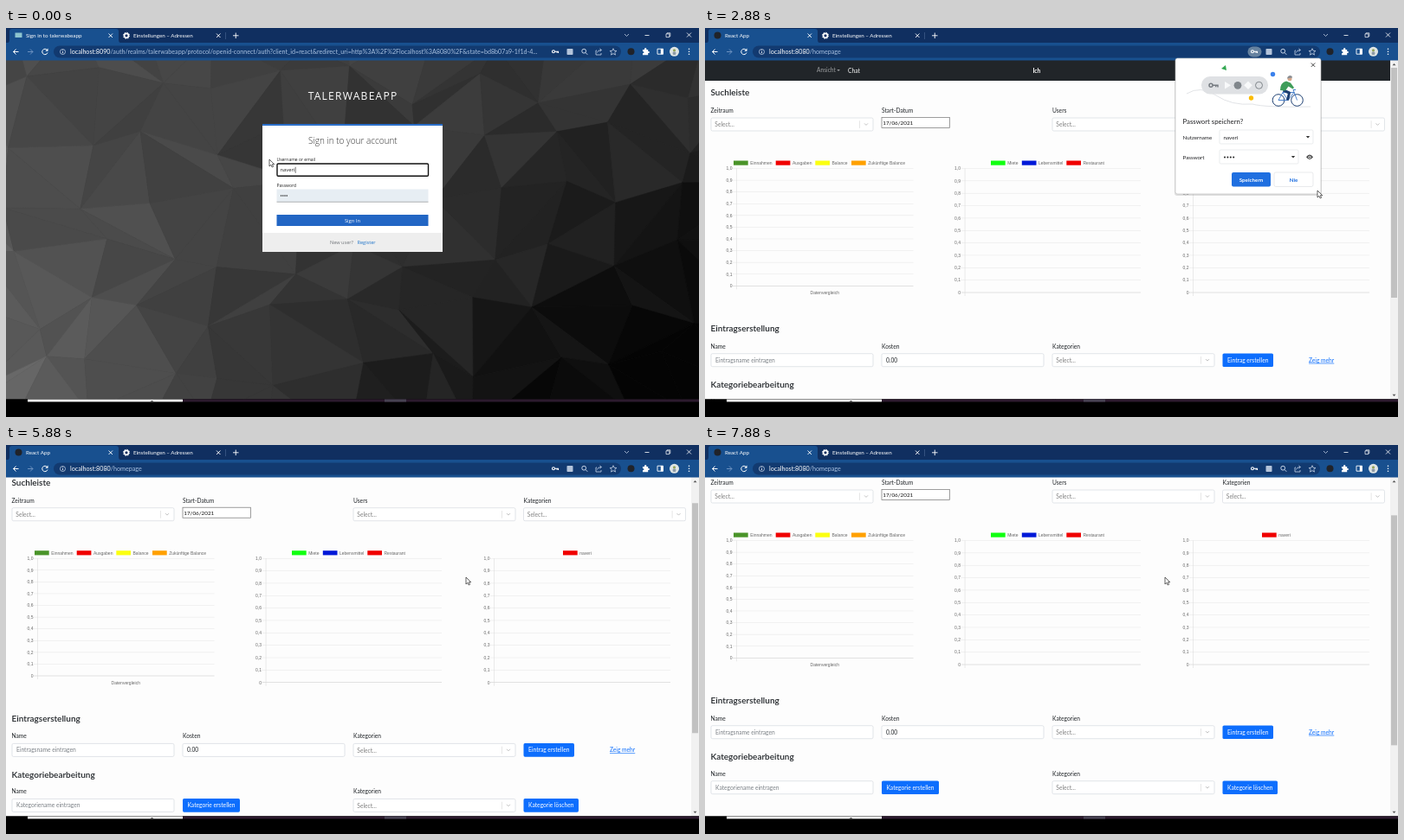
Animation of 800x450 px, one loop 8000 ms. Source, as an HTML page:

```html
<!DOCTYPE html>
<html lang="de">
<head>
<meta charset="utf-8">
<title>Household budget demo</title>
<style>
html,body{margin:0;width:100%;height:100%;overflow:hidden;background:#000}
svg{display:block;width:100vw;height:100vh}
text{font-family:Lato,"Open Sans",sans-serif;white-space:pre}
.os{font-family:"Open Sans","Noto Sans",sans-serif}
.ch{font-family:"Liberation Sans",Arial,sans-serif}
</style>
</head>
<body>
<svg id="stage" viewBox="0 0 800 450" xmlns="http://www.w3.org/2000/svg"></svg>
<script>
const LOOP = 8000, STEP = 125;
const USER = 'naveri', APP = 'talerwabeapp';
const BLUE = '#0d6efd', INK = '#212529', HINT = '#7b8086';

const rect = (x, y, w, h, fill, extra = '') =>
  `<rect x="${x}" y="${y}" width="${w}" height="${h}" fill="${fill}" ${extra}/>`;
const circle = (x, y, r, fill, extra = '') =>
  `<circle cx="${x}" cy="${y}" r="${r}" fill="${fill}" ${extra}/>`;
const line = (d, color, width = 1, extra = '') =>
  `<path d="${d}" fill="none" stroke="${color}" stroke-width="${width}" ${extra}/>`;
const shape = (d, fill, extra = '') => `<path d="${d}" fill="${fill}" ${extra}/>`;
// cy is the vertical middle of the capitals
const text = (x, cy, s, size, fill = INK, extra = '') =>
  `<text x="${x}" y="${cy + size * 0.36}" font-size="${size}" fill="${fill}" ${extra}>${s}</text>`;
const mid = (x, cy, s, size, fill, extra = '') =>
  text(x, cy, s, size, fill, 'text-anchor="middle" ' + extra);
const group = (id, body, extra = '') => `<g id="${id}" ${extra}>${body}</g>`;
const hidden = 'style="display:none"';

function keyIcon(x, y, color) {
  return circle(x - 2, y, 1.5, 'none', `stroke="${color}" stroke-width="1.1"`) +
    line(`M${x - .5} ${y}h4v1.7M${x + 2} ${y}v1.4`, color, 1.1);
}

function browser() {
  const w = '#fff', dim = '#c3d2e8';
  return rect(0, 0, 800, 18, '#102f60') +
    shape('M2 17.5Q4 17 4 14V4Q4 1 7 1H127Q130 1 130 4V14Q130 17 132 17.5Z', '#18508f') +
    rect(0, 17, 800, 20.5, '#18508f') +
    rect(55, 20.5, 655, 14, '#123a70', 'rx="7"') +
    group('loginTab', rect(10.5, 5.5, 8, 5.5, '#8cc4cf') + text(23, 8.5, 'Sign in to ' + APP, 6.25, w) +
      text(74, 27.3, `<tspan fill="#fff">localhost:8090</tspan>/auth/realms/${APP}/protocol/openid-connect/auth?client_id=react&amp;redirect_uri=http%3A%2F%2Flocalhost%3A8080%2F&amp;state=bd8b07a9-1f1d-4...`, 7.15, '#a9c1e0')) +
    group('homeTab', circle(14.5, 8.5, 4, '#20232a') + text(23, 8.5, 'React App', 6.25, w) +
      text(74, 27.3, '<tspan fill="#fff">localhost:8080</tspan>/homepage', 7.2, '#a9c1e0'), hidden) +
    line('M118.5 6.5l4.5 4.5m0-4.5l-4.5 4.5M243 6.5l4.5 4.5m0-4.5l-4.5 4.5M262 8.8h6.5m-3.25-3.25v6.5', w, .9) +
    circle(139, 8.8, 2.4, 'none', 'stroke="#fff" stroke-width="1.6"') +
    circle(139, 8.8, 3.6, 'none', 'stroke="#fff" stroke-width="1" stroke-dasharray="1.4 1.43"') +
    text(147, 8.5, 'Einstellungen – Adressen', 6.25, w) + rect(253, 5, .6, 8, '#4b6994') +
    line('M714 7l2.5 2.5L719 7', dim, .8) + line('M737.5 8.5h5', w, .8) +
    line('M762 6.8h3.8v3.8h-3.8zM763 6.8v-1h3.8v3.8h-1', w, .7) +
    line('M786 5.5l5 5m0-5l-5 5', w, .8) +
    line('M14.5 27.5H8.5m3-3l-3 3l3 3', w, 1) +
    line('M25 27.5h6m-3-3l3 3l-3 3', '#7699c4', .9) +
    line('M47.5 25.5A3.2 3.2 0 1 0 48 28.5', w, 1) + shape('M48.5 23.5v3.2h-3.2z', w) +
    circle(65.5, 27.5, 3, 'none', 'stroke="#dbe6f5" stroke-width=".7"') +
    line('M65.5 27v2.2m0-3.8v.8', w, .8) +
    group('keyGlow', rect(626.5, 21.5, 16, 12, '#66829f', 'rx="6"'), hidden) +
    keyIcon(634, 27.3, w) +
    rect(647.5, 24, 7, 7, '#b4c4da', 'rx=".8"') +
    circle(667.2, 26.7, 2.4, 'none', 'stroke="#dbe6f5" stroke-width=".9"') + line('M669 28.5l2.3 2.3', dim, 1) +
    line('M682 26h-1v5h6v-2m-4.5-.5q.5-3 4.5-3m-1.5-1.7l2 1.7l-2 1.7', dim, .8) +
    shape('M701 23.7l1.1 2.6 2.8.2-2.1 1.9.7 2.7-2.5-1.5-2.5 1.5.7-2.7-2.1-1.9 2.8-.2z', 'none', 'stroke="#dbe6f5" stroke-width=".7"') +
    circle(721.5, 27.3, 4, '#20232a') +
    shape('M735 25h2q-.3-2 1.2-2t1.2 2h1.8v2q1.8-.2 1.8 1t-1.8 1v2.3H735v-2q1.5-.2 1.5-1.1t-1.5-1.1z', w) +
    line('M752 24.2h6.5v6h-6.5z', w, .9) + rect(755.8, 24, 2.8, 6.4, w) +
    circle(771.5, 27.3, 5.5, '#dfe5e4') + circle(771.5, 25.8, 1.6, '#93a45c') + rect(769.7, 27.4, 3.6, 3.6, '#8d9aa6', 'rx="1"') +
    [24.3, 27.3, 30.3].map(y => circle(788.5, y, .8, w)).join('');
}

function facets() {
  const rnd = n => { const v = Math.sin(n * 91.7 + 4.1) * 43758.5453; return v - Math.floor(v); };
  const point = (c, r) => [c * 76 - 55 + (rnd(c * 17 + r) - .5) * 52, r * 66 + (rnd(c * 29 + r * 7 + 300) - .5) * 46];
  const triangle = (pts, seed) => {
    const u = (pts[0][0] + pts[1][0] + pts[2][0]) / 2400, v = ((pts[0][1] + pts[1][1] + pts[2][1]) / 3 - 37) / 392;
    const g = Math.max(4, Math.round(74 - 26 * u + 22 * v - 80 * u * v + (rnd(seed) - .5) * 17));
    const c = `rgb(${g},${g},${g})`;
    return `<polygon points="${pts.map(p => p.map(n => n.toFixed(1))).join(' ')}" fill="${c}" stroke="${c}" stroke-width=".5"/>`;
  };
  let out = '';
  for (let c = 0; c < 12; c++) for (let r = 0; r < 7; r++) {
    const a = point(c, r), b = point(c + 1, r), d = point(c, r + 1), e = point(c + 1, r + 1), k = c * 50 + r * 2 + 900;
    out += rnd(k + 5000) > .5 ? triangle([a, b, d], k) + triangle([b, e, d], k + 1)
      : triangle([a, b, e], k) + triangle([a, e, d], k + 1);
  }
  return out;
}

function login() {
  const os = 'class="os"';
  return rect(0, 37, 800, 393, '#333') + facets() +
    mid(400.6, 78.5, APP.toUpperCase(), 12.07, '#fff', os + ' letter-spacing="1.25"') +
    rect(296, 111, 208, 148, '#fff') + rect(296, 111, 208, 2, '#2b6fc9') + rect(296, 237, 208, 22, '#eeeeee') +
    mid(400.4, 130.8, 'Sign in to your account', 10, '#333', os + ' font-weight="300"') +
    text(312.5, 152.6, 'Username or email', 5, '#222', os) +
    group('blurred', rect(313, 157, 174.5, 14.5, '#fff', 'stroke="#e6e6e6" stroke-width=".5"') + rect(312.8, 171, 175, .7, '#888')) +
    group('focused', rect(313, 157, 174.5, 14.3, '#fff', 'stroke="#111" stroke-width="1.4" rx="1.2"') + rect(333.8, 160.8, .6, 7, '#111')) +
    text(316.5, 164.4, USER, 5.83, '#222', os) +
    text(312.5, 182.2, 'Password', 5, '#222', os) +
    rect(312.5, 186.5, 175, 14.5, '#e7eef3') + rect(312.5, 200.8, 175, .7, '#8a8d90') +
    [0, 1, 2, 3].map(i => circle(317.6 + i * 2.2, 194, .8, '#222')).join('') +
    `<rect id="signIn" x="312.5" y="216" width="175" height="13"/>` +
    mid(400, 222.6, 'Sign In', 5.83, '#fff', os) +
    text(374, 247.8, 'New user?', 5.6, '#72767b', os) + text(405.5, 247.8, 'Register', 5.6, '#1f74c9', os);
}

function chart(x0, x1, bottom, legendX, items, label) {
  const ch = 'class="ch"', gap = (bottom - 162.5) / 10;
  let out = '';
  for (let i = 0; i <= 10; i++) {
    const y = 162.5 + gap * i, value = i === 0 ? '1,0' : i === 10 ? '0' : '0,' + (10 - i);
    out += rect(x0, y - .25, x1 - x0, .5, i === 10 ? '#c4c4c4' : '#e4e4e4') +
      text(x0 - .5, y, value, 5, '#666', ch + ' text-anchor="end"');
  }
  out += rect(x0 + 4.3, 162.5, .5, bottom - 158.5, '#d6d6d6');
  if (label) out += mid((x0 + x1) / 2 + 2, bottom + 7.8, label, 5, '#666', ch);
  return out + items.map(([dx, color, name]) =>
    rect(legendX + dx, 153.5, 16.7, 5.2, color) + text(legendX + dx + 19.2, 156.2, name, 5, '#666', ch)).join('');
}

const box = (x, y, w) => rect(x, y, w, 15, '#fff', 'stroke="#ced4da" stroke-width=".6" rx="1.6"');
const input = (x, y, w, s, color = HINT) => box(x, y, w) + text(x + 5, y + 7.6, s, 6.67, color);
const select = (x, y, w) => box(x, y, w) + text(x + 4.3, y + 7.8, 'Select...', 6.67, '#808080') +
  rect(x + w - 15.7, y + 3.3, .5, 8.6, '#ccc') +
  line(`M${x + w - 10} ${y + 6.4}l2 2l2-2`, '#bbb', .9);
const button = (x, y, w, s, fill = BLUE, color = '#fff', h = 15.6) =>
  rect(x, y, w, h, fill, 'rx="1.6"') + mid(x + w / 2, y + h / 2, s, 6.67, color);
const heading = (x, y, s) => text(x, y, s, 10, INK, 'font-weight="600"');
const label = (x, y, s) => text(x, y, s, 6.67);

function page() {
  const money = [[0, '#4a9429', 'Einnahmen'], [48.7, '#f00000', 'Ausgaben'], [94.3, '#fbff10', 'Balance'], [136, '#ffa000', 'Zukünftige Balance']];
  const categories = [[0, '#10ff10', 'Miete'], [35.8, '#0018d8', 'Lebensmittel'], [87.3, '#f00000', 'Restaurant']];
  const cells = [[7, 'Name'], [103, 'Kosten'], [212, 'User'], [289, 'Kategorie'], [436.5, 'Zeitpunkt'], [585, 'Beschreibung']];
  return rect(0, 37, 791, 550, '#fdfdfd') + rect(0, 37, 791, 24, INK) +
    group('navEmpty', text(131, 49.3, 'Chat', 6.67, '#fff')) +
    group('navFull', text(129, 49, 'Ansicht', 6.67, '#9b9d9f') + shape('M152.3 48h3.6l-1.8 1.9z', '#9b9d9f') +
      text(165, 49.3, 'Chat', 6.67, '#fff') + text(378.5, 49.3, 'Ich', 6.67, '#fff', 'font-weight="700"') +
      button(582, 40.8, 50, 'Einstellungen', '#f8f9fa', INK, 17) + button(633, 41.3, 31.5, 'Logout', BLUE, '#fff', 15.8)) +
    heading(6.5, 74.8, 'Suchleiste') +
    label(6.5, 95.5, 'Zeitraum') + label(204, 95.5, 'Start-Datum') + label(401, 95.5, 'Users') + label(597.5, 95.5, 'Kategorien') +
    select(7, 104, 187) + select(401, 104, 187) + select(597.5, 104, 187) +
    rect(204, 103.5, 78.5, 12, '#fff', 'stroke="#767676" stroke-width=".7"') + text(205.3, 110, '17/06/2021', 6.3, '#111') +
    group('wideChart', chart(32, 768, 298.3, 297, money, 'Datenvergleich')) +
    group('charts', chart(32, 240.5, 298.3, 33, money, 'Datenvergleich') +
      chart(295.5, 503, 306, 330, categories) + chart(559, 767, 306, 643, [[0, '#f00000', USER]])) +
    heading(6.5, 347.8, 'Eintragserstellung') +
    label(6.5, 368.3, 'Name') + label(204, 368.3, 'Kosten') + label(401, 368.3, 'Kategorien') +
    input(7, 376.7, 187, 'Eintragsname eintragen') + input(204, 376.7, 187, '0.00', INK) + select(401, 376.7, 187) +
    button(597.5, 376.4, 58.5, 'Eintrag erstellen') +
    text(697, 384.3, 'Zeig mehr', 6.67, BLUE, 'text-decoration="underline"') +
    heading(6.5, 412.3, 'Kategoriebearbeitung') +
    label(6.5, 432.3, 'Name') + label(401, 432.3, 'Kategorien') +
    input(7, 440.7, 187, 'Kategoriename eintragen') + button(204, 440.4, 66, 'Kategorie erstellen') +
    select(401, 440.7, 187) + button(597.5, 440.4, 63.5, 'Kategorie löschen') +
    label(6.5, 491.3, 'Name') + label(269, 491.3, 'Kategorien') +
    input(7, 499.7, 252, 'Neuer Kategoriename') + select(269, 499.7, 253) + button(532, 499.4, 67, 'Kategorie editieren') +
    heading(0, 528.5, 'Einträge') +
    rect(1, 538, 789.5, 16, '#6c757d', 'rx="1.5"') +
    mid(198, 546.3, 'Eintrag ändern', 6.67, '#fff') + mid(592.5, 546.3, 'Eintrag löschen', 6.67, '#fff') +
    rect(7, 561.3, 778, 14.4, '#fff', 'stroke="#dee2e6" stroke-width=".6"') +
    cells.map(([x, s]) => rect(x - .3, 561.3, .6, 14.4, '#dee2e6') + text(x + 2, 568.7, s, 6.67, INK, 'font-weight="700"')).join('');
}

function scrollbar() {
  return rect(791, 37, 9, 393, '#f1f1f1') + shape('M793.5 43.3h4l-2-2.3z', '#555') + shape('M793.5 423.8h4l-2 2.3z', '#555') +
    '<rect id="thumb" x="792" width="7" height="266" fill="#c1c1c1"/>';
}

function popup() {
  const field = (y, w) => rect(594, y, w, 16, '#fff', 'stroke="#dcdfe3" stroke-width=".6" rx="1.5"') +
    shape(`M${594 + w - 8.2} ${y + 7}h4.4l-2.2 2.4z`, '#333');
  const navy = '#1d3f72';
  return rect(542, 35, 170, 159, '#000', 'opacity=".12" rx="3"') +
    rect(543, 35, 168, 157, '#fff', 'rx="2.5" stroke="#bbb" stroke-width=".6"') +
    line('M699.8 40.5l4.4 4.4m0-4.4l-4.4 4.4', '#444', 1) +
    line('M556 76Q572 66 590 78T632 88Q646 92 699 91', '#dadce0', .8) +
    rect(573, 56, 77, 20.5, '#dfe1e4', 'rx="10"') +
    circle(584, 66.3, 2, 'none', 'stroke="#777c82" stroke-width="1.5"') + line('M586 66.3h6v2.3m-2.3-2.3v2', '#777c82', 1.5) +
    shape('M600 62l7 4.3l-7 4.3z', '#f8f9fa') + circle(615, 66.3, 4.4, '#80868b') +
    shape('M627 61.5l4.8 4.8l-4.8 4.8l-4.8-4.8z', '#f8f9fa') + circle(639.5, 66.3, 4, 'none', 'stroke="#80868b" stroke-width="1"') +
    shape('M596 47l5-4l1 6z', '#34a853') + circle(655.5, 53.5, 2.7, '#3b82ec') + circle(630.5, 81, 2.7, '#fbbc04') +
    circle(662, 83.5, 6.8, 'none', `stroke="${navy}" stroke-width="1"`) + circle(683.5, 83.5, 6.8, 'none', `stroke="${navy}" stroke-width="1"`) +
    line('M662 83.5l5-9h13l-7 9l-6-9m16.5 9l-4.5-12h3M662 83.5h11', '#3976c8', .9) +
    line('M667.5 72l7 3l-2 8.5', navy, 3, 'stroke-linejoin="round"') +
    shape('M664 72q0-9 7-10.5l5 2l4 5.5l-1.5 1.5l-5-3l-3.5 5z', '#3f9d5a') +
    circle(675, 58.7, 2.5, '#d7a98c') + shape('M672 58.5q.5-3.5 3.5-3.5q2.5 0 2.5 2.5z', '#8c8f94') +
    text(551.5, 108.6, 'Passwort speichern?', 7.8, '#202124') +
    text(551.5, 126.5, 'Nutzername', 6.25, '#202124') + field(118, 108) + text(598.5, 126.5, USER, 6.25, '#202124') +
    text(551.5, 149.5, 'Passwort', 6.25, '#202124') + field(141, 91) +
    [0, 1, 2, 3].map(i => circle(600 + i * 3.4, 149.5, 1, '#222')).join('') +
    shape('M694 149.3q4-5.5 8 0q-4 5.5-8 0z', '#444') + circle(698, 149.3, 1.6, '#fff') + circle(698, 149.3, .9, '#444') +
    rect(608, 167, 45, 16.5, '#1f6fe0', 'rx="2"') + mid(630.5, 175.4, 'Speichern', 6.25, '#fff', 'font-weight="700"') +
    rect(657, 167, 45, 16.5, '#fff', 'rx="2" stroke="#dadce0" stroke-width=".6"') + mid(679.5, 175.4, 'Nie', 6.25, '#1f6fe0', 'font-weight="700"');
}

const taskbar = rect(0, 429.5, 800, 21, '#000') + rect(204, 429.5, 596, 3, '#2c1a2e') + rect(25, 429.6, 179, 2.8, '#fff') +
  rect(437, 429.5, 25, 3, '#474252') + rect(167, 431.3, 3, 1, '#333');

const outline = 'stroke="#222" stroke-width=".7" stroke-linejoin="round"';
const arrow = shape('M0 0v8l1.9-1.7 1.3 2.7 1.4-.7-1.3-2.6h2.5z', '#fff', outline);
const hand = shape('M-.9 4V.5q.9-1.2 1.6 0V3.2l3 .8q.9.5.6 1.8l-.7 3H-.6l-2.2-3.3q.4-1.2 1.9.2z', '#fff', outline);

const stage = document.getElementById('stage');
stage.innerHTML = '<clipPath id="view"><rect y="37" width="800" height="392.5"/></clipPath>' +
  `<g clip-path="url(#view)">${group('login', login())}${group('home', group('page', page()) + scrollbar())}</g>` +
  browser() + group('popup', popup()) + taskbar + group('cursor', group('arrow', arrow) + group('hand', hand));

const el = id => document.getElementById(id);
const show = (id, on) => { el(id).style.display = on ? '' : 'none'; };
const smooth = p => { p = Math.min(1, Math.max(0, p)); return p * p * (3 - 2 * p); };

const path = [[0, 304, 152], [375, 304, 152], [1125, 393, 218], [2125, 393, 218], [2875, 707, 188],
  [3250, 681, 172], [3500, 681, 172], [4375, 646, 74], [5250, 646, 74], [5700, 531, 153], [LOOP, 531, 153]];
function pointer(t) {
  const i = path.findIndex(p => p[0] > t), [t0, x0, y0] = path[i - 1], [t1, x1, y1] = path[i];
  const p = smooth((t - t0) / (t1 - t0));
  return [x0 + (x1 - x0) * p, y0 + (y1 - y0) * p];
}

// each wheel notch moves the page 52 px
const notches = [[5750, 1], [5950, 1], [6150, 1], [7250, -1], [7500, -1]];
const scrollAt = t => notches.reduce((sum, [at, dir]) => sum + dir * 52 * smooth((t - at) / 220), 0);

function draw(time) {
  const t = Math.floor((time % LOOP) / STEP) * STEP;
  const home = t >= 1625, loaded = t >= 2375, asking = t >= 1875 && t < 3375;
  const [x, y] = pointer(t), scroll = scrollAt(t);
  const hover = !home && x > 312 && y > 215;
  const onNie = asking && x > 657 && x < 702 && y > 167 && y < 184;

  show('login', !home); show('loginTab', !home);
  show('home', home); show('homeTab', home);
  show('focused', t < 1250); show('blurred', t >= 1250);
  el('signIn').setAttribute('fill', hover ? '#0b3f86' : '#2266c4');
  show('navEmpty', !loaded); show('wideChart', !loaded);
  show('navFull', loaded); show('charts', loaded);
  show('popup', asking); show('keyGlow', asking);
  el('page').setAttribute('transform', `translate(0 ${-scroll})`);
  el('thumb').setAttribute('y', 46 + scroll * .68);
  el('cursor').setAttribute('transform', `translate(${x} ${y})`);
  show('hand', hover || onNie); show('arrow', !hover && !onNie);
}

const start = performance.now();
function tick() {
  draw(performance.now() - start);
  requestAnimationFrame(tick);
}
tick();
</script>
</body>
</html>
```
